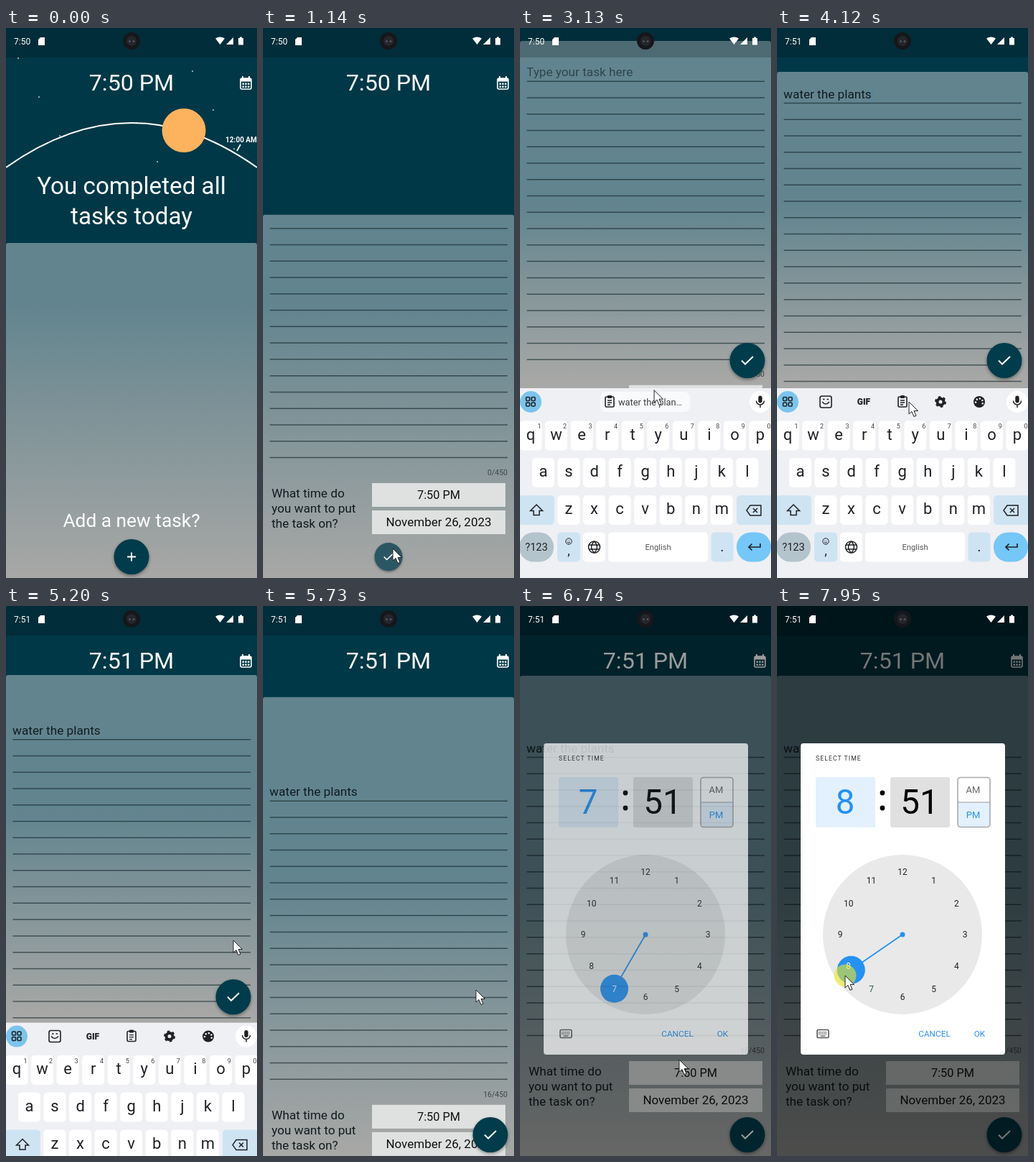
These frames come from a looping animation (350x765 px, 8000 ms). An HTML page:

```html
<!DOCTYPE html>
<html lang="en">
<head>
<meta charset="utf-8">
<title>Task planner</title>
<style>
html, body { margin: 0; width: 100%; height: 100%; overflow: hidden; background: #003847; }
svg { display: block; width: 350px; height: 765px; font-family: Roboto, sans-serif; }
#fab { filter: drop-shadow(0 2px 2px rgba(0, 0, 0, .4)); }
</style>
</head>
<body>
<svg id="stage" viewBox="0 0 350 765"></svg>
<script>
const DURATION = 8000;
const INK = '#202124', BLUE = '#2591f2', PALE = '#e3f0fd', TEAL = '#003c4b', SOFT = '#cfe4f3';

// Markup helpers. Text is placed by the middle of its capitals.
const text = (x, y, s, size, fill = '#fff', anchor = 'middle', more = '') =>
  `<text x="${x}" y="${y + size * .355}" font-size="${size}" fill="${fill}" text-anchor="${anchor}" ${more}>${s}</text>`;
const rect = (x, y, w, h, fill, r = 0, more = '') =>
  `<rect x="${x}" y="${y}" width="${w}" height="${h}" rx="${r}" fill="${fill}" ${more}/>`;
const frame = (x, y, w, h, r, color = INK) => rect(x, y, w, h, 'none', r, `stroke="${color}" stroke-width="1.6"`);
const circle = (x, y, r, fill, more = '') => `<circle cx="${x}" cy="${y}" r="${r}" fill="${fill}" ${more}/>`;
const ring = (x, y, r, width = 1.5, more = '') => circle(x, y, r, 'none', `stroke="${INK}" stroke-width="${width}" ${more}`);
const line = (d, color = INK, width = 1.5, more = '') =>
  `<path d="${d}" fill="none" stroke="${color}" stroke-width="${width}" ${more}/>`;
const group = (s, id) => `<g id="${id}">${s}</g>`;
const repeat = (n, f) => Array.from({ length: n }, (_, i) => f(i)).join('');
const polar = (deg, r, cx, cy) => {
  const a = deg * Math.PI / 180;
  return [cx + r * Math.sin(a), cy - r * Math.cos(a)];
};
const onDial = deg => polar(deg, 87, 175, 457);

function header() {
  return text(175, 76, '', 32.2, '#fff', 'middle', 'id="clock"') +
    frame(327, 70, 15, 15, 2, '#fff') + rect(327, 70, 15, 4.5, '#fff') + line('M330 67v4M339 67v4', '#fff', 2) +
    repeat(6, i => rect(329.5 + i % 3 * 3.8, 76.5 + (i > 2) * 4, 2.4, 2.4, '#fff'));
}

function sky() {
  return repeat(9, i => circle((17 + i * 243) % 350, 42 + i * 18, 1, '#b9cdd2')) +
    line('M0 194Q175 70 350 194', '#fff', 2) + circle(248, 142.5, 30.5, '#fdb25e') +
    text(328, 155, '12:00 AM', 10, '#fff', 'middle', 'font-weight="700"') + line('M327 162l-5 9', '#fff', 1.8) +
    text(175, 219, 'You completed all', 33.2) + text(175, 261, 'tasks today', 33.2);
}

function form() {
  const field = (y, s, size) => rect(152, y - 16.5, 186, 33, '#dfe1e1') + text(245, y - .5, s, size, '#111');
  return repeat(18, i => line(`M9.5 ${210.4 + i * 22.77}H341`, 'rgba(12,30,36,.6)', 1.5)) +
    text(9, 197.5, '', 17.2, '#111c20', 'start', 'id="entry"') +
    rect(9, 189, 1.5, 18, '#2a8fd0', 0, 'id="caret" opacity=".4"') +
    text(341, 618, '', 10.5, '#3f474a', 'end', 'id="count"') +
    ['What time do', 'you want to put', 'the task on?']
      .map((s, i) => text(12, 647 + i * 21, s, 17.2, '#111c20', 'start')).join('') +
    field(649.5, '7:50 PM', 16.3) + field(687.5, 'November 26, 2023', 17);
}

const clipboard = x => frame(x - 6, 513, 12, 14, 1.5) + rect(x - 3, 511, 6, 4, INK, 1) +
  line(`M${x - 3} 518h6m-6 3h6m-6 3h4`, INK, 1.3);

function keyboard() {
  const key = (x, y, w, fill = '#fff', r = 5) => rect(x - w / 2, y - 20.5, w, 41, fill, r);
  const row = (letters, x0, y) => [...letters].map((c, i) => {
    const x = x0 + i * 35.55;
    return key(x, y, 31) + text(x, y - 2, c, 22, INK) +
      (letters.length === 10 ? text(x + 12, y - 13, (i + 1) % 10, 9, '#444') : '');
  }).join('');
  const tools = frame(60, 512, 16, 16, 2.5) + line('M63 520q5 6 10 0M64 516.5h2.5m3 0h2.5') +
    text(121, 520, 'GIF', 12, INK, 'middle', 'font-weight="900"') + clipboard(175) +
    ring(228, 520, 4.5, 4) + ring(228, 520, 7, 2, 'stroke-dasharray="3.67"') +
    circle(282, 520, 8, INK) + repeat(5, i => circle(...polar(i * 50 - 90, 5, 282, 520.5), 1.3, '#eee'));
  const chip = rect(112, 506, 125, 28, '#f9fafc', 8) + clipboard(125) +
    text(137, 520, 'water the plan…', 12.8, '#3c4043', 'start');
  return rect(0, 501, 350, 265, '#eff0f4') + circle(15, 520, 15, '#7cc4ec') +
    repeat(4, i => frame(8.5 + i % 2 * 7.5, 513.5 + (i > 1) * 7.5, 5, 5, 1.3)) +
    circle(335, 520, 15, '#fff') + rect(332.3, 511.5, 5.4, 10, INK, 2.7) +
    line('M329.5 518.5a5.5 5.5 0 0 0 11 0M335 524v4') +
    group(tools, 'tools') + group(chip, 'chip') +
    row('qwertyuiop', 15, 567) + row('asdfghjkl', 32.5, 618.5) + row('zxcvbnm', 68, 670.5) +
    key(23, 670.5, 50, SOFT) + line('M23 663l-8.5 8.5h4.5v6h8v-6h4.5z') +
    key(327, 670.5, 50, SOFT) + line('M316 671l5-7h15v14h-15zM325 668l6 6m0-6l-6 6') +
    key(23, 722, 48, '#b4c4cc', 20) + text(23, 722, '?123', 14.5, INK) +
    key(68, 722, 32, SOFT) + ring(68, 714, 4.2, 1) +
    line('M66 715q2 2.5 4 0M66.5 713h.8m1.4 0h.8', INK, 1) + text(68, 727, ',', 18, INK) +
    key(103.5, 722, 31) + ring(103.5, 722, 8) + line('M96 719h15m-15 6h15M103.5 714q-8 8 0 16q8-8 0-16', INK, 1.3) +
    key(192.5, 722, 139) + text(192.5, 722, 'English', 11.2, '#555') +
    key(282, 722, 31, SOFT) + text(282, 721, '.', 20, INK) +
    key(326, 722, 48, '#75c7f7', 20) + line('M335 717v5h-16m4.5-4.5l-4.5 4.5l4.5 4.5', INK, 1.7);
}

function dialog() {
  const box = (x, s, fill, color, id) => rect(x, 238, 83, 70, fill, 3) +
    text(x + 41, 272, s, 47.5, color, 'middle', `id="${id}"`);
  return rect(33, 191, 285, 433, '#fff', 4) +
    text(54, 212, 'SELECT TIME', 8.6, '#333', 'start', 'letter-spacing="1.1"') +
    box(54, '', PALE, BLUE, 'hour') + box(158, '51', '#e0e0e0', '#000', 'minute') +
    circle(147, 260, 3.4, '#000') + circle(147, 281, 3.4, '#000') +
    rect(252, 273, 45, 35, PALE, 3) + frame(252, 238.5, 45, 69, 4, '#aaa') + line('M252 273h45', '#999', 1) +
    text(273.5, 255, 'AM', 13, '#666') + text(273.5, 290, 'PM', 13, BLUE) +
    circle(175, 457, 111, '#e9e9e9') + circle(175, 457, 3.5, BLUE) +
    line('', BLUE, 1.8, 'id="hand"') + circle(0, 0, 19.5, BLUE, 'id="knob"') +
    repeat(12, i => text(...onDial(i * 30), i || 12, 12, '#222', 'middle', `id="n${i}"`)) +
    frame(56, 589.5, 16, 11, 1.5, '#555') +
    line('M58 592.8h12m-12 2.4h12', '#555', 1.4, 'stroke-dasharray="1.4 1"') + line('M60.5 598h7', '#555', 1.3) +
    text(219.5, 595, 'CANCEL', 11.8, BLUE) + text(282.5, 595, 'OK', 11.8, BLUE);
}

function statusBar() {
  return text(11, 18.5, '', 12, '#fff', 'start', 'id="status"') +
    '<path d="M48 13h6v11h-9v-8zM292 14.5q6.5-4 13 0L298.5 23zM317 13v10h-10zM324 14h2v-1.5h3v1.5h2v9.5h-7z" fill="#fff"/>' +
    circle(175, 18, 12, '#15171b') + circle(175, 18, 7, '#24262b') +
    circle(172.5, 18.5, 1.5, '#50545b') + circle(178, 18.5, 1.5, '#50545b');
}

document.getElementById('stage').innerHTML =
  `<defs><linearGradient id="fade" gradientUnits="userSpaceOnUse" x2="0">
    <stop offset=".5" stop-color="#62848e"/><stop offset="1" stop-color="#a8a8a6"/>
  </linearGradient><clipPath id="inside">${rect(0, 0, 350, 1000, '#000', 0, 'id="edge"')}</clipPath></defs>` +
  rect(0, 0, 350, 765, '#003847') + header() + group(sky(), 'sky') +
  rect(0, 0, 350, 1000, 'url(#fade)', 3, 'id="sheet"') +
  group(text(175, 685, 'Add a new task?', 26.3), 'prompt') +
  `<g clip-path="url(#inside)">${group(form(), 'form')}</g>` +
  group(circle(0, 0, 24.5, TEAL, 'id="disc"') + line('', '#fff', 2, 'id="sign"'), 'fab') +
  group(keyboard(), 'keys') + rect(0, 0, 350, 41, 'rgba(0,0,0,.2)') +
  rect(0, 0, 350, 765, '#000', 0, 'id="scrim"') + group(dialog(), 'dialog') + statusBar() +
  group(circle(0, 0, 15.5, 'rgba(238,230,40,.6)', 'id="press"') +
    '<path d="M0 0v17l4-3.5 3 7 3-1.3-3-6.7h5.5z" fill="#fff" stroke="#222"/>', 'cursor');

const el = {};
document.querySelectorAll('#stage [id]').forEach(e => el[e.id] = e);
const set = (id, attrs) => { for (const k in attrs) el[id].setAttribute(k, attrs[k]); };
const show = (id, on) => set(id, { visibility: on ? 'inherit' : 'hidden' });
const move = (id, x, y, s = 1) => set(id, { transform: `translate(${x} ${y}) scale(${s})` });

const ramp = (t, from, to) => Math.min(1, Math.max(0, (t - from) / (to - from)));
const ease = (t, from, to) => {
  const u = ramp(t, from, to);
  return u * u * (3 - 2 * u);
};

// Cursor journeys: start, end, and where the tip arrives.
const START = [226, 765];
const journeys = [[200, 470, 181, 724], [1400, 1900, 193, 472], [2930, 3260, 184, 520], [4300, 4650, 317, 465],
  [5400, 5730, 297, 534], [5870, 6250, 222, 631], [7000, 7650, 95, 514]];
const taps = [870, 2000, 3670, 4870, 6470, 7850];

function pointer(t) {
  return journeys.reduce(([x, y], [from, to, toX, toY]) => {
    const u = ease(t, from, to);
    return [x + (toX - x) * u, y + (toY - y) * u];
  }, START);
}

function draw(t) {
  const home = t < 1140, pasted = t >= 3870, focused = t >= 2140 && t < 5060;
  const time = pasted ? '7:51' : '7:50';

  // The keyboard pushes the page up, which then settles on the entry; closing reverses this.
  const rise = ease(t, 1000, 1500), push = ease(t, 2140, 2785), settle = ease(t, 2785, 3260);
  const close = ease(t, 5060, 5450), relax = ease(t, 5450, 5925);
  const top = home ? 299 : 299 - 202 * rise - 273 * push + 237 * settle + 118 * close - 82 * relax;
  const shift = 273 * (close - push) + 167 * (settle - relax);
  const fabY = 735.5 + 273 * (close - push);
  const swap = ramp(t, 1100, 1500);

  el.status.textContent = time;
  el.clock.textContent = time + ' PM';
  show('sky', home);
  show('prompt', home);
  show('form', !home);
  set('sheet', { y: top });
  set('edge', { y: top });
  set('fade', { y2: fabY + 30 });
  move('form', 0, shift);
  el.entry.textContent = pasted ? 'water the plants' : 'Type your task here';
  set('entry', { opacity: pasted ? 1 : .6 });
  el.count.textContent = pasted ? '16/450' : '0/450';
  set('caret', { x: pasted ? 132 : 9 });
  show('caret', !home && focused && (t + 130) % 1000 < 500);

  move('fab', swap < .5 ? 175 : 317, fabY, home ? 1 : Math.abs(1 - 2 * swap));
  set('disc', { fill: !home && swap < .5 ? '#2b5663' : TEAL });
  set('sign', { d: home ? 'M-6 0H6M0-6V6' : 'M-8 0l5 5L8-5.5' });

  move('keys', 0, 264 * (1 - ease(t, 2140, 2665) + close));
  show('tools', pasted);
  show('chip', !pasted);

  const fade = t < 6740 ? 0 : ease(t, 6620, 6805), picked = t >= 7800;
  const [x, y] = onDial(210 + 30 * ease(t, 7800, 8000));
  set('scrim', { opacity: fade * .54 });
  set('dialog', { opacity: fade });
  set('hand', { d: `M175 457L${x} ${y}` });
  set('knob', { cx: x, cy: y });
  el.hour.textContent = picked ? 8 : 7;
  set('n7', { fill: picked ? '#17614f' : '#fff' });
  set('n8', { fill: picked ? '#fff' : '#222' });

  show('cursor', t >= 200);
  move('cursor', ...pointer(t));
  show('press', taps.some(tap => t >= tap && t < tap + 120));
}

function tick() {
  draw(performance.now() % DURATION);
  requestAnimationFrame(tick);
}
tick();
</script>
</body>
</html>
```
